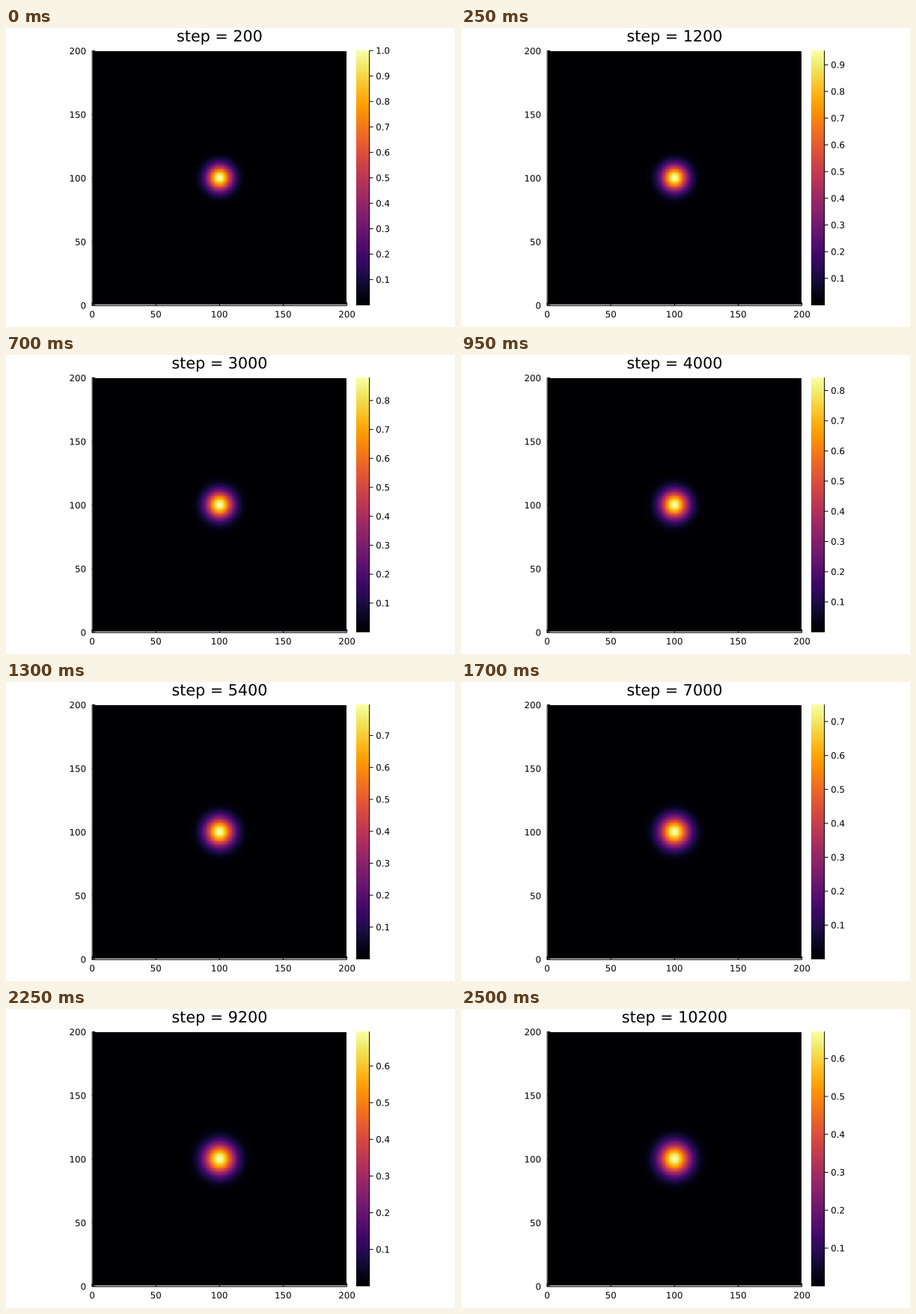
A matplotlib script that plays this animation: 600 px wide and 400 px high, repeating every 2.55 s.

```python
import numpy as np
import matplotlib.pyplot as plt
from matplotlib.animation import FuncAnimation
from matplotlib.patches import PathPatch, Rectangle
from matplotlib.path import Path
from matplotlib.textpath import TextPath

plt.rcParams["font.family"] = "DejaVu Sans"

W, H = 600, 400
FRAMES, INTERVAL = 51, 50
STEP = 200                   # simulation steps per frame
N = 200                      # grid cells per side
WIDTH = 100.0                # initial blob is exp(-r^2 / WIDTH)
SPREAD = 4.9e-5              # relative growth of WIDTH per step

LEFT, TOP, BOTTOM = 115.15, 30.5, 371.0
SCALE = (BOTTOM - TOP) / N
RIGHT = LEFT + N * SCALE
HEAT_L, HEAT_R, HEAT_T, HEAT_B = 115.5, 455.0, 31.0, 370.15
BAR_L, BAR_R, BAR_T, BAR_B = 468, 485.65, 30.15, 370.65
TICK_SIZE, TITLE_SIZE = 11.83, 20.7
PX = 0.72                    # one pixel in points


def px(v):
    return LEFT + SCALE * v


def py(v):
    return BOTTOM - SCALE * v


def glyphs(text, x, baseline, size, align="center"):
    """Outline of a text in pixel coordinates, y pointing down."""
    path = TextPath((0, 0), text, size=size)
    box = path.get_extents()
    shift = {"left": 0, "center": (box.x0 + box.x1) / 2, "right": box.x1}[align]
    return Path(path.vertices * (1, -1) + (x - shift, baseline), path.codes)


fig = plt.figure(figsize=(W / 100, H / 100), dpi=100, facecolor="white")
ax = fig.add_axes([0, 0, 1, 1])


def add_text(path):
    return ax.add_patch(PathPatch(path, facecolor="black", linewidth=0))


def line(xs, ys):
    return ax.plot(xs, ys, color="black", lw=PX, solid_capstyle="butt",
                   snap=False)[0]


# Cells are centred on 1..N; the view cuts the last one in half
cells = np.arange(1, N + 1) - N / 2
r2 = cells[None, :] ** 2 + cells[:, None] ** 2
half_x = (HEAT_R - HEAT_L) / (2 * N - 1)
half_y = (HEAT_B - HEAT_T) / (2 * N - 1)
heat = ax.imshow(np.exp(-r2 / WIDTH), cmap="inferno", vmin=0, vmax=1,
                 origin="lower", interpolation="nearest", aspect="auto",
                 extent=(HEAT_L, HEAT_R + half_x, HEAT_B, HEAT_T - half_y))
# The clip box includes its last pixel column
heat.set_clip_path(Rectangle((115, HEAT_T), HEAT_R - 115.7, 340,
                             transform=ax.transData))
ax.imshow(np.linspace(0, 1, 256)[:, None], cmap="inferno", origin="lower",
          interpolation="nearest", aspect="auto",
          extent=(BAR_L, 486, BOTTOM, TOP))

ax.set_xlim(0, W)
ax.set_ylim(H, 0)
ax.axis("off")

line([LEFT, LEFT], [TOP, BOTTOM + 1])
line([LEFT, RIGHT], [371.5, 371.5])
line([BAR_R, BAR_R], [BAR_T, BAR_B])
for v in range(0, N + 1, 50):
    line([px(v)] * 2, [BOTTOM - 4, BOTTOM])
    line([LEFT, LEFT + 4], [py(v)] * 2)
    add_text(glyphs(str(v), px(v), 387.2, TICK_SIZE))
    add_text(glyphs(str(v), 106.3, py(v) + 4.6, TICK_SIZE, "right"))

title = add_text(glyphs("step", 0, 0, TITLE_SIZE))
bar_labels = add_text(glyphs("0.1", 0, 0, TICK_SIZE))
bar_ticks = line([], [])


def draw(i):
    growth = 1 + SPREAD * STEP * i
    peak = 1 / growth
    heat.set_data(np.exp(-r2 / (WIDTH * growth)))

    title.set_path(glyphs(f"step = {STEP * (i + 1)}", 285.3, 18.0, TITLE_SIZE))

    count = int(peak * 10 + 1e-9)
    values = np.arange(1, count + 1) / 10
    ys = BAR_B - (BAR_B - BAR_T) * values / peak
    bar_labels.set_path(Path.make_compound_path(
        *[glyphs(f"{v:.1f}", 494.2, y + 4.35, TICK_SIZE, "left")
          for v, y in zip(values, ys)]))
    bar_ticks.set_data(np.tile([BAR_R, BAR_R + 5, np.nan], count),
                       np.repeat(ys, 3))
    return heat, title, bar_labels, bar_ticks


anim = FuncAnimation(fig, draw, frames=FRAMES, interval=INTERVAL,
                     repeat=True, repeat_delay=0, blit=False)
plt.show()
```
